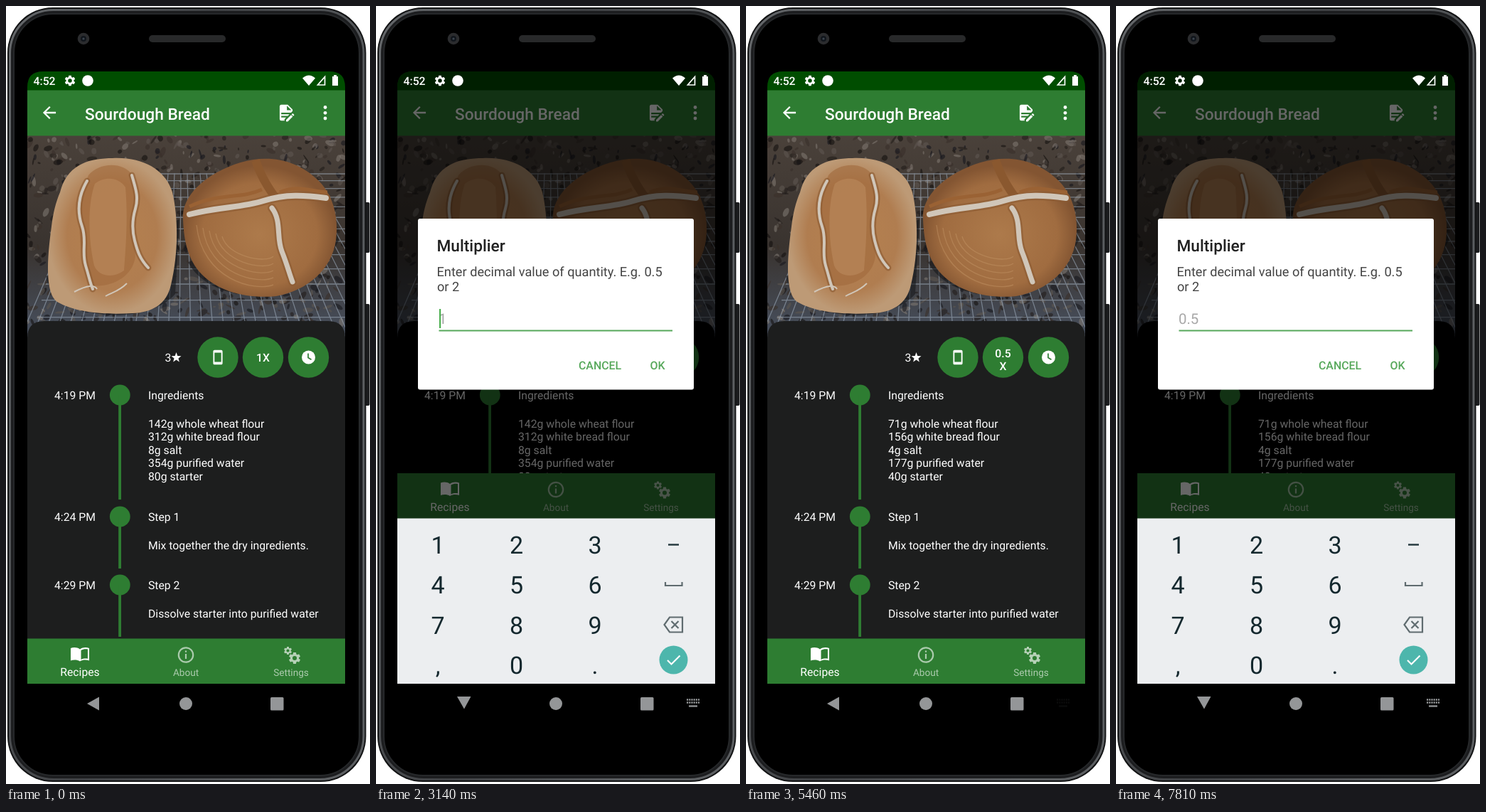
Recreate the animation shown at these times as an HTML page. Size 512 by 1094 pixels, loop 8 s.

```html
<!DOCTYPE html>
<html lang="en">
<head>
<meta charset="utf-8">
<title>Recipe multiplier</title>
<style>
html, body { margin: 0; width: 100%; height: 100%; overflow: hidden; background: #fff; }
svg { display: block; width: 100%; height: 100%; font-family: Roboto, sans-serif; text-rendering: geometricPrecision; }
.med { font-weight: 500; }
.mid { text-anchor: middle; }
.body { font-size: 15.75px; fill: #fff; }
.key { font-size: 34px; fill: #14282e; text-anchor: middle; }
</style>
</head>
<body>
<svg id="stage" viewBox="0 0 512 1094"></svg>
<script>
const GREEN = '#2e7d32', ACCENT = '#57a85b', DP = 1.136, LOOP = 8000;
const GEAR = 'M19.14 12.94c.04-.3.06-.61.06-.94 0-.32-.02-.64-.07-.94l2.03-1.58c.18-.14.23-.41.12-.61l-1.92-3.32c-.12-.22-.37-.29-.59-.22l-2.39.96c-.5-.38-1.03-.7-1.62-.94l-.36-2.54c-.04-.24-.24-.41-.48-.41h-3.84c-.24 0-.43.17-.47.41l-.36 2.54c-.59.24-1.13.57-1.62.94l-2.39-.96c-.22-.08-.47 0-.59.22L2.74 8.87c-.12.21-.08.47.12.61l2.03 1.58c-.05.3-.09.63-.09.94s.02.64.07.94l-2.03 1.58c-.18.14-.23.41-.12.61l1.92 3.32c.12.22.37.29.59.22l2.39-.96c.5.38 1.03.7 1.62.94l.36 2.54c.05.24.24.41.48.41h3.84c.24 0 .44-.17.47-.41l.36-2.54c.59-.24 1.13-.56 1.62-.94l2.39.96c.22.08.47 0 .59-.22l1.92-3.32c.12-.22.07-.47-.12-.61zM12 15.6a3.6 3.6 0 1 1 0-7.2a3.6 3.6 0 0 1 0 7.2z';

const range = n => [...Array(n).keys()];
const rect = (x, y, w, h, fill, more = '') => `<rect x="${x}" y="${y}" width="${w}" height="${h}" fill="${fill}" ${more}/>`;
const circle = (x, y, r, fill, more = '') => `<circle cx="${x}" cy="${y}" r="${r}" fill="${fill}" ${more}/>`;
const path = (d, fill, more = '') => `<path d="${d}" fill="${fill}" ${more}/>`;
const line = (d, stroke, w, more = '') => path(d, 'none', `stroke="${stroke}" stroke-width="${w}" ${more}`);
const text = (x, y, s, more = 'class="body"') => `<text x="${x}" y="${y}" ${more}>${s}</text>`;
const group = (id, inner, more = '') => `<g id="${id}" ${more}>${inner}</g>`;
// 24-unit icon centred on x, y
const icon = (x, y, k, d, more = '') => path(d, '#fff', `transform="translate(${x - 12 * k} ${y - 12 * k}) scale(${k})" ${more}`);

let seed = 7;
const rnd = () => (seed = seed * 16807 % 2147483647) / 2147483647;

function photo() {
  const tones = ['#14110f', '#221d1a', '#5e5650', '#7d766f', '#3a302a', '#17171d'];
  const stones = range(800).map(() => {
    const x = 30 + rnd() * 447, y = 182 + rnd() * 285, a = rnd() * 180;
    return `<ellipse rx="${1.5 + rnd() * 6}" ry="${1 + rnd() * 3}" fill="${tones[rnd() * 6 | 0]}" opacity=".6" transform="translate(${x} ${y}) rotate(${a})"/>`;
  }).join('');
  const wires = range(35).map(i => `M${120 + 9 * i} 235L${20 + 16 * i} 467`).join('') +
    range(14).map(i => `M${116 - 6 * i} ${236 + 9 * i + i * i * .65}H477`).join('');
  const pale = '#d0c6b9';
  const score = (d, w) => line(d, '#8a5a33', w + 5, 'opacity=".6" stroke-linecap="round"') + line(d, pale, w, 'stroke-linecap="round"');
  return rect(30, 182, 447, 286, 'url(#granite)') + stones +
    line(wires, '#a3b1c2', 1.3, 'opacity=".55"') +
    path('M56 380C70 445 200 450 238 405L244 300ZM256 360C290 425 420 425 468 330L460 300Z', '#17181c', 'opacity=".6"') +
    path('M76 262C86 222 118 214 150 214C195 212 225 232 234 262C243 300 242 350 232 392C226 420 205 431 178 432C140 434 100 432 72 416C52 402 60 340 64 310C66 292 70 276 76 262Z', 'url(#loafA)') +
    path('M116 238C130 220 165 218 178 238C188 280 178 320 182 352C178 385 140 398 118 392C100 345 98 280 116 238Z', '#a06a3c', 'opacity=".6"') +
    path('M125 250C140 238 160 242 168 255C172 300 168 345 166 372C150 384 130 380 124 365C116 330 114 280 125 250Z', '#b8875a', 'opacity=".7"') +
    score('M114 246C101 268 100 290 107 310S106 345 112 365S118 388 122 398', 4) +
    score('M177 238C182 256 187 268 182 285S177 315 181 330S188 355 200 368', 4) +
    line('M96 402C115 392 125 392 128 398M140 408C150 402 158 402 170 390', pale, 2) +
    path('M249 300C246 262 290 232 330 220C370 208 410 216 440 246C462 268 468 300 464 330C458 370 425 400 380 408C340 412 300 402 276 378C256 358 250 330 249 300Z', 'url(#loafB)') +
    line(range(5).map(i => `M${268 + 9 * i} ${308 + 4 * i}C${276 + 9 * i} ${385 - 8 * i} ${350 + 4 * i} ${402 - 10 * i} 376 ${392 - 10 * i}`).join(''), '#c99b6c', 1.4, 'opacity=".4"') +
    line('M351 217C358 238 366 252 378 268', '#8a582f', 12) +
    score('M258 293C300 282 330 284 362 274S420 266 450 270', 8) +
    score('M374 284C388 302 380 325 388 345S398 375 403 388', 7) +
    line('M258 282C300 262 330 272 360 258M385 262C410 250 432 262 452 262', '#9a6234', 5);
}

const bullet = (y, end) => circle(160.3, y, 14.4, GREEN) + rect(158.2, y, 3.8, end - y, GREEN);
const step = (y, end, time, title, note) => bullet(y, end) + text(68, y + 6, time) +
  text(200, y + 6, title) + text(200, y + 45.5, note);

function tabs() {
  const small = 'class="mid" font-size="13.6" fill="#fff" opacity=".6"';
  return rect(30, 889.5, 447, 64, GREEN) +
    path('M104 904.5C100 901.5 95 901.5 91 903V920.5C95 919 100 919 104 921.5C108 919 113 919 117 920.5V903C113 901.5 108 901.5 104 904.5ZM105.5 906C109 904 112 904 115 904.6V917.8C112 917.3 109 917.3 105.5 919Z', '#fff', 'fill-rule="evenodd"') +
    text(104, 942, 'Recipes', 'class="body mid"') +
    circle(253, 912.5, 10.2, 'none', 'stroke="#fff" stroke-width="2.2" opacity=".6"') +
    path('M251.9 911h2.2v7h-2.2zM251.9 906.5h2.2v2.3h-2.2z', '#fff', 'opacity=".6"') +
    text(253, 942, 'About', small) +
    icon(396.5, 906.5, .58, GEAR, 'opacity=".65"') + icon(406, 917, .84, GEAR, 'opacity=".65"') +
    text(401, 942, 'Settings', small);
}

function keyboard() {
  const cols = [87, 197.5, 308];
  const keys = ['1', '2', '3', '4', '5', '6', '7', '8', '9', ',', '0', '.'].map((k, i) =>
    text(cols[i % 3], 769.5 + 56.5 * (i / 3 | 0), k, `class="key" id="key${i}"`)).join('');
  return rect(30, 720.5, 447, 233, '#eceef0') +
    rect(254, 898, 109, 55, '#dde2e5', 'id="dotKey" rx="4"') + keys +
    line('M411 757.5H426', '#22363c', 2.4) +
    line('M407 810V815H430.5V810', '#5f6b6f', 2.2) +
    line('M413 859.5H431V880.5H413L405.5 870ZM415.5 865L425.5 875M425.5 865L415.5 875', '#5f6b6f', 2.2) +
    circle(418.5, 919.5, 20, '#4db6ac') + line('M410 920L415.5 925.5L427.5 913.5', '#fff', 2.2);
}

function dialog() {
  const button = `class="med" font-size="15.9" fill="${ACCENT}"`;
  const info = 'font-size="18.2" fill="#434343"';
  return rect(59, 299, 388, 240.5, '#fff', 'rx="3"') +
    text(85.5, 344.5, 'Multiplier', 'class="med" font-size="22.7" fill="#212121"') +
    text(85.5, 379.5, 'Enter decimal value of quantity. E.g. 0.5', info) + text(86, 401, 'or 2', info) +
    text(88, 447, '', 'id="field" font-size="20.4"') +
    rect(88.5, 455.5, 328.5, 2, ACCENT) + rect(0, 426, 2.2, 27, '#4caf50', 'id="cursor"') +
    text(285, 510.5, 'CANCEL', button) + text(385.5, 510.5, 'OK', button);
}

const star = range(10).map(i => {
  const a = i * Math.PI / 5, r = i % 2 ? 3.1 : 7.4;
  return `${i ? 'L' : 'M'}${239.5 + r * Math.sin(a)} ${494.5 - r * Math.cos(a)}`;
}).join('') + 'Z';

document.getElementById('stage').innerHTML = `
<defs>
  <linearGradient id="granite" x2="0" y2="1"><stop stop-color="#4a413a"/><stop offset=".55" stop-color="#39332f"/><stop offset="1" stop-color="#485160"/></linearGradient>
  <radialGradient id="loafA"><stop stop-color="#b5814f"/><stop offset=".7" stop-color="#b07d50"/><stop offset="1" stop-color="#bd9a76"/></radialGradient>
  <radialGradient id="loafB" cy=".55"><stop stop-color="#ad7a4b"/><stop offset=".75" stop-color="#a06c40"/><stop offset="1" stop-color="#835532"/></radialGradient>
  <radialGradient id="spot"><stop stop-color="#8a8a8a" stop-opacity=".32"/><stop offset="1" stop-color="#8a8a8a" stop-opacity=".2"/></radialGradient>
  <linearGradient id="rim" x2="1" y2=".4"><stop stop-color="#66696c"/><stop offset=".5" stop-color="#3e4043"/><stop offset="1" stop-color="#5c5f62"/></linearGradient>
  <clipPath id="screen"><path d="M30 953V114Q30 92 52 92H455Q477 92 477 114V953Z"/></clipPath>
</defs>` +
  rect(504, 276, 7.5, 71, '#1b1c1e', 'rx="2"') + rect(504, 419, 7.5, 143, '#1b1c1e', 'rx="2"') +
  rect(2, 2, 504.5, 1089, '#121314', 'rx="64"') +
  rect(5.5, 5.5, 497.5, 1082, '#1c1d1f', 'rx="61" stroke="url(#rim)" stroke-width="3"') +
  rect(11, 11, 486, 1071, '#000', 'rx="55" stroke="#26282a" stroke-width="2"') +
  circle(109, 46, 8.3, '#2b2c2e') + circle(109, 46, 4, '#11161c') + circle(109, 46, 1.6, '#3c4650') +
  rect(201, 41, 108, 10, '#28292a', 'rx="5"') +
  group('smudge', circle(340, 917.5, 38.5, '#6c6e70')) +
  '<g clip-path="url(#screen)">' +
    photo() +
    rect(30, 92, 447, 27, '#004d00') + rect(30, 118.5, 447, 64, GREEN) +
    icon(61, 150, DP, 'M20 11H7.83l5.59-5.59L12 4l-8 8 8 8 1.41-1.41L7.83 13H20v-2z') +
    text(111, 159.5, 'Sourdough Bread', 'class="med" font-size="22.7" fill="#fff"') +
    icon(394, 150, DP, 'M6 2C4.89 2 4 2.9 4 4V20A2 2 0 0 0 6 22H10V20.09L12.09 18H6V16H14.09L16.09 14H6V12H18.09L20 10.09V8L14 2H6M13 3.5L18.5 9H13V3.5M20.15 13C20 13 19.86 13.05 19.75 13.16L18.73 14.18L20.82 16.26L21.84 15.25C22.05 15.03 22.05 14.67 21.84 14.46L20.54 13.16C20.43 13.05 20.29 13 20.15 13M18.14 14.77L12 20.92V23H14.08L20.23 16.85L18.14 14.77Z') +
    [142.5, 150.3, 158].map(y => circle(449, y, 2.4, '#fff')).join('') +
    path('M30 953V467Q30 443 54 443H453Q477 443 477 467V953Z', '#1d1e1e', 'id="panel"') +
    text(223.5, 500, '3') + path(star, '#fff') +
    circle(298, 494, 28.7, GREEN) +
    icon(298, 494, .94, 'M17 1L7 1c-1.1 0-2 .9-2 2v18c0 1.1.9 2 2 2h10c1.1 0 2-.9 2-2V3c0-1.1-.9-2-2-2zM17 19H7V5h10v14z') +
    circle(361.5, 494, 28.7, GREEN, 'id="factor"') +
    text(361.5, 500, '1X', 'class="body med mid" id="whole"') +
    group('half', text(361.5, 494, '0.5', 'class="body med mid"') + text(361.5, 512, 'X', 'class="body med mid"')) +
    circle(425.5, 494, 28.7, GREEN) + circle(425.5, 494, 9.5, '#fff') + line('M425 488.5V494.5L429.5 497.2', GREEN, 1.7) +
    bullet(547, 694) + text(68, 553, '4:19 PM') + text(200, 553, 'Ingredients') +
    range(5).map(i => text(200, 592.5 + 18.6 * i, '', `class="body" id="item${i}"`)).join('') +
    step(718, 791, '4:24 PM', 'Step 1', 'Mix together the dry ingredients.') +
    step(814, 887, '4:29 PM', 'Step 2', 'Dissolve starter into purified water') +
    group('tabs', tabs()) +
    circle(0, 0, 39.5, 'url(#spot)', 'id="touch"') +
    rect(30, 92, 447, 861, '#000', 'id="dim"') +
    group('dialog', dialog()) + group('keys', keyboard()) +
    text(38.5, 111, '4:52', 'class="body med"') + icon(90, 105, .76, GEAR) + circle(115, 105, 7.8, '#fff') +
    path('M417 101.5Q426 93.5 435 101.5L426 112Z', '#fff') +
    line('M448.5 99.5V111H438.5Z', '#fff', 1.7) + path('M461 97H465V99H467V112H459V99H461Z', '#fff') +
  '</g>' +
  path('', '#949698', 'id="back"') + circle(253, 981, 9, '#949698') + rect(372, 972, 18.5, 18.5, '#949698', 'rx="1.5"') +
  group('kbIcon', [975.5, 979.5].map(y => line(`M437 ${y}H455`, '#949698', 2.3, 'stroke-dasharray="2.2 1"')).join('') +
    line('M440 984.5H452', '#949698', 2.3));

const el = {};
document.querySelectorAll('[id]').forEach(e => el[e.id] = e);
const set = (id, name, value) => el[id].setAttribute(name, value);
const show = (id, on) => set(id, 'visibility', on ? 'visible' : 'hidden');

// Each entry keeps the values before it and changes only those named
const base = { dim: 0, alpha: 0, dy: 0, kb: 0, caret: 0, typed: '', factor: 1, touch: null, dot: 0, five: 0 };
const cues = [
  [1090, { touch: [371, 497] }],
  [1250, { touch: null, dim: .35, alpha: .55, dy: 40, kb: .5 }],
  [1400, { dim: .6, alpha: 1, dy: 2, kb: 1, caret: 89 }],
  [1570, { dy: 0 }], [1720, { caret: 0 }],
  [2200, { caret: 89 }], [2670, { caret: 0 }], [3140, { caret: 89 }], [3750, { caret: 0 }],
  [4050, { dot: 1 }],
  [4210, { typed: '.', caret: 94 }],
  [4380, { dot: .25 }],
  [4530, { typed: '.5', caret: 105.5, five: 1 }],
  [4680, { five: 0 }], [5000, { caret: 0 }],
  [5310, { dim: .3, alpha: .4, kb: .35, dot: 0 }],
  [5460, { dim: 0, alpha: 0, kb: 0, typed: '', factor: .5 }],
  [7170, { touch: [386, 479] }],
  [7340, { touch: null, dim: .35, alpha: .55, dy: 40, kb: .5 }],
  [7490, { dim: .6, alpha: 1, dy: 2, kb: 1, caret: 89 }],
  [7660, { dy: 0 }], [7810, { caret: 0 }],
];
const amounts = [[142, 'g whole wheat flour'], [312, 'g white bread flour'], [8, 'g salt'], [354, 'g purified water'], [80, 'g starter']];

function draw(now) {
  const t = now % LOOP;
  const s = Object.assign({}, base, ...cues.filter(c => c[0] <= t).map(c => c[1]));
  amounts.forEach(([n, label], i) => el['item' + i].textContent = n * s.factor + label);
  show('whole', s.factor === 1);
  show('half', s.factor !== 1);
  show('touch', s.touch);
  if (s.touch) set('touch', 'transform', `translate(${s.touch})`);
  set('factor', 'fill', s.touch ? '#1a5420' : GREEN);
  set('panel', 'fill', s.dim === .6 ? '#000' : '#1d1e1e');
  set('dim', 'opacity', s.dim);
  set('dialog', 'opacity', s.alpha);
  set('dialog', 'transform', `translate(0 ${s.dy})`);
  set('tabs', 'transform', `translate(0 ${-232.5 * s.kb})`);
  set('keys', 'transform', `translate(0 ${233 * (1 - s.kb)})`);
  set('dotKey', 'opacity', s.dot);
  set('key4', 'opacity', s.five ? .7 : 1);
  show('cursor', s.caret);
  set('cursor', 'x', s.caret);
  el.field.textContent = s.typed || s.factor;
  set('field', 'fill', s.typed ? '#2a2a2a' : '#a8a8a8');
  show('smudge', t >= 4210 && t < 5310);
  set('back', 'd', s.kb ? 'M114 971H133.5L124 988.5Z' : 'M114 981L131 971.5V990.5Z');
  set('kbIcon', 'opacity', s.kb ? 1 : t > 5310 ? .07 : 0);
}

const start = performance.now();
(function tick(now) {
  draw(Math.max(0, now - start));
  requestAnimationFrame(tick);
})(start);
</script>
</body>
</html>
```
